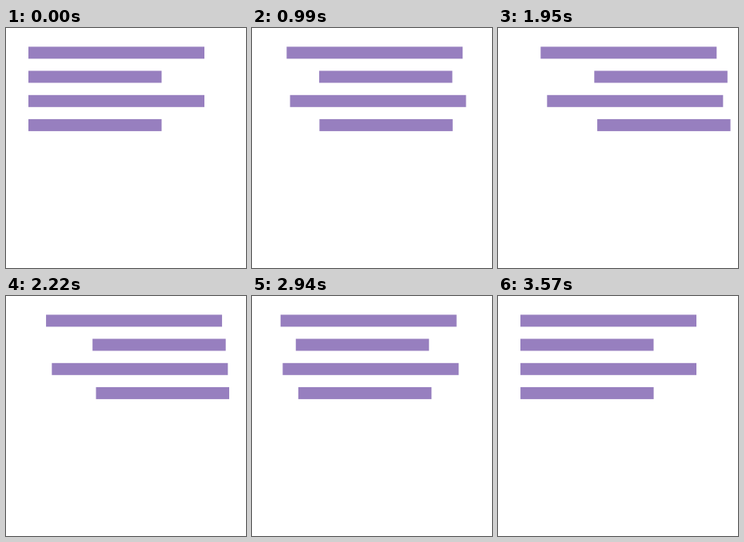
An HTML page for the animation above (3780 ms loop, 300x300 px).

```html
<!DOCTYPE html>
<html lang="en">
<head>
<meta charset="utf-8">
<title>Sliding bars</title>
<style>
  html, body { margin: 0; width: 100%; height: 100%; overflow: hidden; background: #fff; }
  svg { display: block; width: 100vw; height: 100vh; }
</style>
</head>
<body>
<svg id="stage" viewBox="0 0 300 300" fill="#977fbf"></svg>
<script>
const LOOP = 3780, STEP = 30, LEFT = 28;

// shift: farthest travel in px; peak and end: times in ms
const bars = [
  { y: 23.4, width: 220, shift: 26, peak: 1770, end: 3600 },
  { y: 53.5, width: 166.5, shift: 95, peak: 1770, end: 3570 },
  { y: 83.8, width: 220, shift: 34, peak: 1800, end: 3600 },
  { y: 113.9, width: 166.5, shift: 98, peak: 1800, end: 3600 }
];

const stage = document.getElementById('stage');
for (const bar of bars) {
  bar.node = document.createElementNS(stage.namespaceURI, 'rect');
  bar.node.setAttribute('y', bar.y);
  bar.node.setAttribute('width', bar.width);
  bar.node.setAttribute('height', 15);
  stage.append(bar.node);
}

function ease(u) {
  u = Math.min(1, Math.max(0, u));
  return u * u * (3 - 2 * u);
}

function offset({ shift, peak, end }, t) {
  return shift * ease(t < peak ? t / peak : (end - t) / (end - peak));
}

function draw(ms) {
  const t = Math.floor((ms % LOOP) / STEP) * STEP;
  for (const bar of bars) {
    bar.node.setAttribute('x', (LEFT + offset(bar, t)).toFixed(3));
  }
}

let start;
function tick(now) {
  start ??= now;
  draw(now - start);
  requestAnimationFrame(tick);
}
draw(0);
requestAnimationFrame(tick);
</script>
</body>
</html>
```
